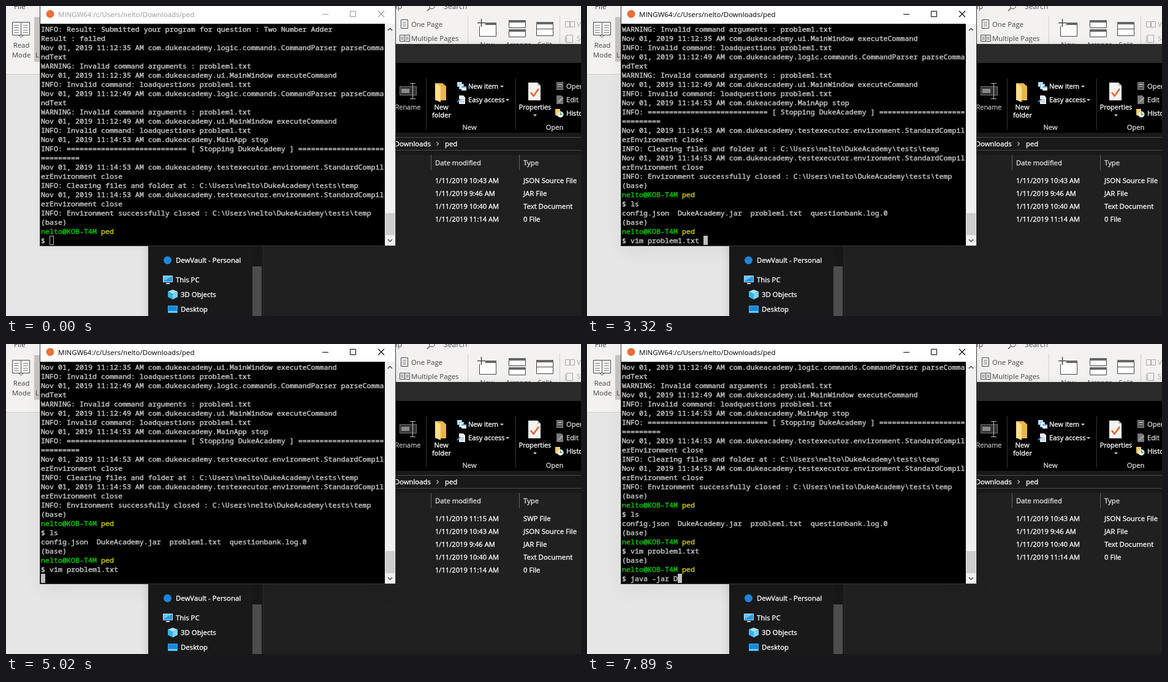
An HTML page with a canvas that plays this animation: 938 by 506 pixels, repeating every 8 s.

```html
<!DOCTYPE html>
<html lang="en">
<head>
<meta charset="utf-8">
<title>Terminal session</title>
<style>
  html, body { margin: 0; width: 100%; height: 100%; overflow: hidden; background: #e6e6e6; }
  canvas { display: block; }
</style>
</head>
<body>
<canvas id="stage" width="938" height="506"></canvas>
<script>
const ctx = document.getElementById('stage').getContext('2d');
const LOOP = 8000;
const COLS = 80, ROWS = 24, CW = 7, CH = 15, TX = 57, TY = 30;
const MONO = '11.667px "Noto Sans Mono", "DejaVu Sans Mono", monospace';
const UI = '"Open Sans", "Noto Sans", sans-serif';
const GREY = '#bfbfbf';
const USER = 'nelto', HOST = 'KOB-T4M';
const PROMPT = USER + '@' + HOST + ' ped';

// ---------- terminal contents ----------
const stamp = (time, rest) => `Nov 01, 2019 ${time} AM com.dukeacademy.${rest}`;
const invalid = time => [
  stamp(time, 'logic.commands.CommandParser parseCommandText'),
  'WARNING: Invalid command arguments : problem1.txt',
  stamp(time, 'ui.MainWindow executeCommand'),
  'INFO: Invalid command: loadquestions problem1.txt'
];
const closing = stamp('11:14:53', 'testexecutor.environment.StandardCompilerEnvironment close');
const temp = `C:\\Users\\${USER}\\DukeAcademy\\tests\\temp`;
const wrap = line => line.match(/.{1,80}/g);

const log = [
  'INFO: Result: Submitted your program for question : Two Number Adder',
  'Result : failed',
  ...invalid('11:12:35'),
  ...invalid('11:12:49'),
  stamp('11:14:53', 'MainApp stop'),
  'INFO: ' + '='.repeat(28) + ' [ Stopping DukeAcademy ] ' + '='.repeat(29),
  closing,
  'INFO: Clearing files and folder at : ' + temp,
  closing,
  'INFO: Environment successfully closed : ' + temp,
  '(base)', PROMPT,
  '$ ls',
  'config.json  DukeAcademy.jar  problem1.txt  questionbank.log.0',
  '(base)', PROMPT,
  '$ vim problem1.txt',
  '(base)', PROMPT
].flatMap(wrap);

const vimText = ['Question::', '', 'Title::Hello World', '', 'Description::des', '',
  'Difficulty::EASY', '', 'Topics::ARRAY', '', 'TestCase::', '', 'Input::123', '', 'Output::123'];

// [time, finished log lines, current line, cursor hidden]; a negative count means the editor
const FIRST = 23, LS = 24, LISTED = 25, SECOND = 27, VIM = 28, THIRD = 30;
const EMPTY = -2, EDIT = -1;
const cues = [
  [0, FIRST, '$ '], [530, FIRST, '$ ', true],
  [990, FIRST, '$ l'], [1070, FIRST, '$ ls'],
  [1220, LS, ''], [1300, LISTED, ''],
  [1380, SECOND, '$ '], [1910, SECOND, '$ ', true],
  [2460, SECOND, '$ v'], [2540, SECOND, '$ vim'], [2620, SECOND, '$ vim '],
  [3000, SECOND, '$ vim p'], [3080, SECOND, '$ vim pr'], [3150, SECOND, '$ vim pro'],
  [3320, SECOND, '$ vim problem1.txt '],
  [3700, VIM, ''],
  [3930, EMPTY, ''],
  [4010, EDIT, ''], [4470, EDIT, '', true], [4790, EDIT, ':'], [4940, EDIT, ':q'],
  [5020, VIM, ''],
  [5170, THIRD, '$ '], [5630, THIRD, '$ ', true],
  [5940, THIRD, '$ j'], [6020, THIRD, '$ jv'],
  [6340, THIRD, '$ j'], [6420, THIRD, '$ ja'], [6490, THIRD, '$ jav'],
  [6570, THIRD, '$ java'], [6640, THIRD, '$ java '],
  [6870, THIRD, '$ java -'],
  [7040, THIRD, '$ java -j'], [7120, THIRD, '$ java -ja'], [7190, THIRD, '$ java -jar'],
  [7340, THIRD, '$ java -jar '], [7820, THIRD, '$ java -jar ', true],
  [7890, THIRD, '$ java -jar D']
];

// ---------- drawing helpers ----------
function box(x, y, w, h, fill) {
  ctx.fillStyle = fill;
  ctx.fillRect(x, y, w, h);
}
function frame(x, y, w, h, stroke, fill) {
  if (fill) box(x, y, w, h, fill);
  ctx.strokeStyle = stroke;
  ctx.lineWidth = 1;
  ctx.strokeRect(x + .5, y + .5, w - 1, h - 1);
}
function path(points, stroke, width = 1) {
  ctx.beginPath();
  for (let i = 0; i < points.length; i += 2) ctx.lineTo(points[i], points[i + 1]);
  ctx.strokeStyle = stroke;
  ctx.lineWidth = width;
  ctx.stroke();
}
function shape(points, fill) {
  ctx.beginPath();
  for (let i = 0; i < points.length; i += 2) ctx.lineTo(points[i], points[i + 1]);
  ctx.fillStyle = fill;
  ctx.fill();
}
function disc(x, y, r, fill) {
  ctx.beginPath();
  ctx.arc(x, y, r, 0, Math.PI * 2);
  ctx.fillStyle = fill;
  ctx.fill();
}
// a thin outline thickens the strokes without changing the widths
function write(text, x, y, fill, heft) {
  ctx.fillStyle = ctx.strokeStyle = fill;
  ctx.fillText(text, x, y);
  if (!heft) return;
  ctx.lineWidth = heft;
  ctx.lineJoin = 'round';
  ctx.strokeText(text, x, y);
}
function label(text, x, y, fill, size = 11.4, align = 'left', heft = 0) {
  ctx.font = `${size}px ${UI}`;
  ctx.textAlign = align;
  write(text, x, y, fill, heft);
}
function light(text, x, y, size = 11.4, align = 'left', fill = '#fff') {
  label(text, x, y, fill, size, align, .35);
}
function cells(text, col, row, fill = GREY, heft = .5) {
  ctx.font = MONO;
  ctx.textAlign = 'left';
  write(text, TX + col * CW, TY + row * CH + 12, fill, heft);
}
function shadowBox(x, y, w, h, blur, drop, alpha) {
  ctx.save();
  ctx.shadowColor = `rgba(0,0,0,${alpha})`;
  ctx.shadowBlur = blur;
  ctx.shadowOffsetY = drop;
  box(x, y, w, h, '#000');
  ctx.restore();
}
const caret = (x, y) => shape([x - 3, y - 1, x + 3, y - 1, x, y + 2], '#ddd');

// ---------- word processor behind ----------
function drawEditorApp() {
  const ink = '#444';
  box(0, 0, 938, 506, '#e6e6e6');
  box(0, 0, 938, 111, '#f3f2f1');
  box(0, 111, 938, 1, '#d0cecc');
  label('File', 13, 5, ink, 11.8);
  box(46, 18, 20, 73, '#c8c6c4');
  frame(10, 26, 15, 22, ink, '#fff');
  frame(24, 26, 15, 22, ink, '#fff');
  for (let y = 31; y < 44; y += 4) {
    box(13, y, 8, 1, '#777');
    box(28, y, 8, 1, '#777');
  }
  path([21, 48, 24.5, 51, 28, 48], ink);
  label('Read', 25, 68, ink, 11.4, 'center');
  label('Mode', 25, 84, ink, 11.4, 'center');
  label('L', 48, 84, ink);

  label('lp', 646, 5, ink, 12, 'right');
  ctx.beginPath();
  ctx.arc(695, 0, 4.5, 0, Math.PI * 2);
  ctx.strokeStyle = ink;
  ctx.stroke();
  path([691.5, 3.5, 687, 8], ink, 1.3);
  label('Search', 714, 5, '#555', 12.2);

  frame(644, 22, 12, 15, ink, '#fff');
  for (let y = 26; y < 35; y += 3) box(647, y, 6, 1, '#666');
  for (const x of [642, 650]) {
    frame(x, 47, 9, 11, ink, '#fff');
    for (let y = 50; y < 56; y += 2) box(x + 2, y, 5, 1, '#777');
  }
  label('One Page', 661, 34, ink);
  label('Multiple Pages', 661, 57, ink);
  box(753, 16, 1, 46, '#d0cecc');
  box(903, 16, 1, 46, '#d0cecc');

  frame(772, 27, 28, 23, ink, '#fff');
  box(772, 27, 28, 4, '#666');
  box(769, 20, 13, 13, '#f3f2f1');
  path([775.5, 21, 775.5, 34], ink, 1.4);
  path([769, 27.5, 782, 27.5], ink, 1.4);
  for (const y of [23, 38]) {
    frame(820, y, 28, 13, ink, '#fff');
    box(820, y, 28, 4, '#666');
  }
  frame(865, 26, 28, 23, ink, '#fff');
  box(865, 26, 28, 4, '#666');
  box(865, 37, 28, 1, ink);
  label('New', 785, 67, ink, 11.4, 'center');
  label('Arrange', 836, 67, ink, 11.4, 'center');
  label('Split', 879, 67, ink, 11.4, 'center');

  const pale = '#a9a7a5';
  frame(912, 25, 8, 10, pale);
  frame(920, 25, 8, 10, pale);
  frame(914, 47, 11, 13, pale);
  path([912.5, 49, 912.5, 59], pale);
  label('View', 931, 34, pale);
  label('Sync', 931, 57, pale);
}

// ---------- file manager ----------
function drawFiles(swap) {
  const soft = '#d8d8d8';
  shadowBox(232, 62, 720, 460, 14, 3, .15);
  box(232, 62, 706, 444, '#202020');
  box(232, 62, 706, 31, '#2b2b2b');
  box(232, 93, 706, 114, '#000');
  box(685, 118, 1, 84, '#333');
  box(831, 118, 1, 84, '#333');

  frame(642, 131, 28, 15, '#777', '#333');
  box(645, 135, 13, 7, '#8a8a8a');
  box(663, 126, 1, 26, '#bbb');
  box(659, 126, 9, 1, '#bbb');
  box(659, 151, 9, 1, '#bbb');
  light('Rename', 655.5, 169, 10.9, 'center', '#b0b0b0');

  shape([700, 126, 712, 126, 718, 131, 718, 154, 700, 154], '#e8b64c');
  shape([700, 126, 709, 131, 709, 157, 700, 153], '#ffdf8a');
  light('New', 710, 169, 11.2, 'center');
  light('folder', 710.5, 182, 11.2, 'center');

  frame(736, 124, 8, 8, '#8cc8ee', '#d9efff');
  frame(739, 127, 8, 9, '#5ea8d8', '#fff');
  box(743, 131, 8, 7, '#e8f4fc');
  box(743, 131, 8, 2, '#4aa0d8');
  shape([739, 146, 746, 146, 749, 149, 749, 160, 739, 160], '#f0f0f0');
  path([736, 157, 741, 152], '#3a92d8', 2);
  box(741, 153, 6, 1, '#7ab');
  box(741, 156, 6, 1, '#7ab');
  light('New item', 754, 135, 11.1);
  light('Easy access', 754, 157, 11.1);
  caret(809, 131);
  caret(818, 153);
  light('New', 756, 202, 11.2, 'center', soft);

  shape([852, 125, 867, 125, 872, 130, 872, 154, 852, 154], '#f5f5f5');
  shape([867, 125, 872, 130, 867, 130], '#bbb');
  path([856, 141, 860.5, 147, 869, 135], '#e0662c', 2.6);
  light('Properties', 863, 169, 10.9, 'center');
  caret(863, 178);

  frame(898, 124, 11, 13, '#8a8a8a', '#555');
  box(900, 127, 7, 2, '#aaa');
  box(900, 131, 7, 1, '#aaa');
  shape([898, 146, 906, 146, 909, 149, 909, 160, 898, 160], '#777');
  path([901, 157, 908, 150], '#bbb', 1.5);
  shape([896, 168, 904, 168, 904, 181, 896, 178], '#f2cc6b');
  disc(904.5, 177, 5, '#e9f2e9');
  path([904.5, 173.5, 904.5, 177, 907.5, 177], '#2f8f46', 1.3);
  light('Open', 914, 135, 11.2, 'left', soft);
  light('Edit', 914, 157, 11.2, 'left', soft);
  light('History', 914, 179, 11.2);
  light('Open', 895, 202, 11.2, 'center', soft);

  box(232, 207, 706, 36, '#191919');
  box(232, 214, 706, 1, '#4b4b4b');
  box(232, 235, 706, 1, '#4b4b4b');
  light('Downloads', 693, 229, 11.4, 'right');
  path([702.5, 222, 705.5, 225, 702.5, 228], '#bbb', 1.1);
  light('ped', 716, 229);

  box(232, 243, 706, 263, '#202020');
  box(693, 243, 1, 25, '#636363');
  box(837, 243, 1, 25, '#636363');
  light('Date modified', 700, 260, 11.3, 'left', '#dedede');
  light('Type', 844, 260, 11.3, 'left', '#dedede');
  const files = [['10:43', 'JSON Source File'], ['9:46', 'JAR File'],
    ['10:40', 'Text Document'], ['11:14', '0 File']];
  if (swap) files.unshift(['11:15', 'SWP File']);
  files.forEach(([time, type], i) => {
    light(`1/11/2019 ${time} AM`, 700, 289 + 21 * i, 11.15);
    light(type, 844, 289 + 21 * i, 11.4);
  });

  box(232, 391, 188, 115, '#191919');
  box(402, 391, 15, 115, '#171717');
  box(402, 425, 15, 81, '#4d4d4d');
  box(419, 391, 1, 115, '#2b2b2b');
  disc(263.5, 415, 6.5, '#1f86dc');
  light('DewVault - Personal', 277, 419);
  frame(256, 440, 16, 11, '#b8d8ea', '#2a9ade');
  shape([257, 441, 271, 441, 257, 449], '#66c5f4');
  box(261, 452, 6, 2, '#b8d8ea');
  light('This PC', 277, 451);
  shape([264, 466, 272, 463, 280, 466, 272, 470], '#a6e4fa');
  shape([264, 466, 272, 470, 272, 479, 264, 475], '#35b3e6');
  shape([280, 466, 272, 470, 272, 479, 280, 475], '#7ed2f2');
  light('3D Objects', 285, 475);
  frame(264, 489, 16, 12, '#38b0ee', '#168ad8');
  box(265, 498, 14, 2, '#7fd0f7');
  light('Desktop', 285, 499);
}

// ---------- terminal window ----------
function drawCursor(col, row, glyph = '') {
  box(TX + col * CW, TY + row * CH, CW, CH, GREY);
  if (glyph) cells(glyph, col, row, '#000');
}

function drawShell(count, input, hidden, active) {
  const first = count + 1 - ROWS;
  for (let r = 0; r < ROWS - 1; r++) {
    const line = log[first + r];
    if (line === PROMPT) {
      cells(line.slice(0, -4), 0, r, '#00bf00');
      cells('ped', line.length - 3, r, '#bfbf00');
    } else cells(line, 0, r);
  }
  cells(input, 0, ROWS - 1);
  if (!active) frame(TX + input.length * CW, TY + 23 * CH, CW, CH, GREY);
  else if (!hidden) drawCursor(input.length, ROWS - 1);
}

function drawVim(command, hidden) {
  vimText.forEach((line, i) => {
    cells(String(i + 1).padStart(3), 0, i, '#ffff40', .7);
    cells(line, 4, i);
  });
  for (let r = vimText.length; r < 22; r++) cells('~', 0, r, '#4a60ff');
  box(TX, TY + 22 * CH, COLS * CW, CH, '#fff');
  cells('problem1.txt [dos] (10:40 01/11/2019)', 0, 22, '#000', .25);
  cells('1,1 All', 73, 22, '#000', .25);
  cells(command || '"problem1.txt" [noeol][dos] 15L, 132C', 0, 23);
  if (command) drawCursor(command.length, 23);
  else if (!hidden) drawCursor(4, 0, 'Q');
}

function drawScrollbar(enabled) {
  const arrow = enabled ? '#505050' : '#bfbfbf';
  box(618, 29, 17, 362, '#f0f0f0');
  if (enabled) box(619, 338, 15, 36, '#cdcdcd');
  else box(618, 338, 16, 1, '#dcdcdc');
  path([623, 40, 626.5, 36.5, 630, 40], arrow, 1.6);
  path([623, 381, 626.5, 384.5, 630, 381], arrow, 1.6);
}

function drawTerminal(t) {
  const [, count, input, hidden] = cues.findLast(cue => cue[0] <= t);
  const active = t >= 70;
  const k = Math.min(1, Math.max(0, (t - 70) / 320));
  shadowBox(56, 0, 579, 391, 10 + 20 * k, 2 + 8 * k, .06);
  box(55, 0, 581, 392, '#3a3a3a');
  box(56, 0, 579, 29, '#fff');
  box(56, 29, 579, 362, '#000');

  const ink = active ? '#000' : '#999';
  disc(72, 13, 6.5, '#e8703a');
  label(`MINGW64:/c/Users/${USER}/Downloads/ped`, 85, 18, ink, 11.5);
  box(516, 13, 10, 1, ink);
  frame(561, 8, 10, 10, ink);
  path([607, 8, 617, 18], ink, 1.1);
  path([617, 8, 607, 18], ink, 1.1);

  if (count === EDIT) drawVim(input, hidden);
  else if (count === EMPTY) drawCursor(0, 0);
  else drawShell(count, input, hidden, active);
  drawScrollbar(count > 0);
}

function render(now) {
  const t = now % LOOP;
  drawEditorApp();
  drawFiles(t >= 4940 && t < 5400);
  drawTerminal(t);
}

const start = performance.now();
function tick() {
  render(performance.now() - start);
  requestAnimationFrame(tick);
}
tick();
</script>
</body>
</html>
```
